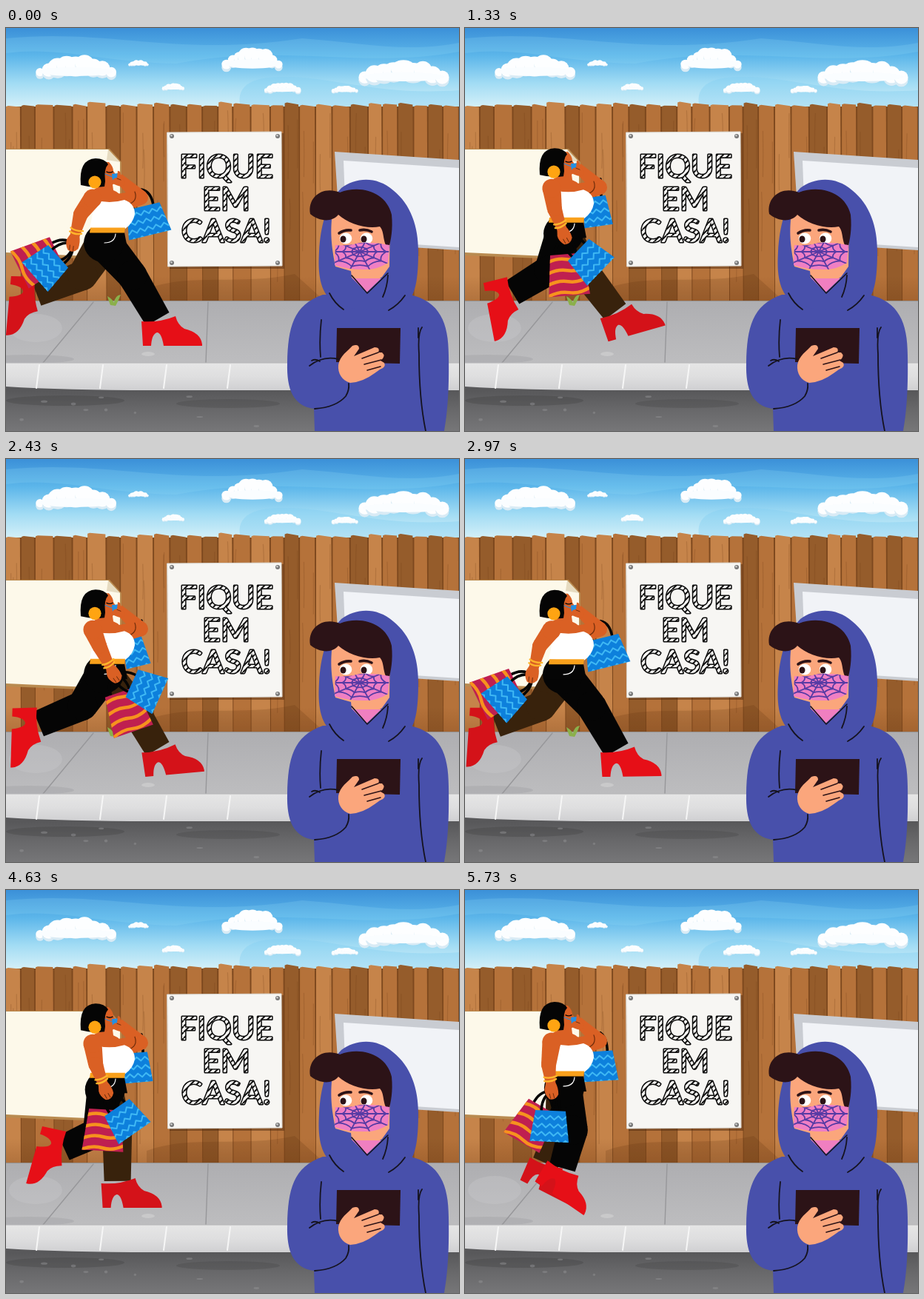
Recreate the animation shown at these times as an HTML page with a canvas. Size 612x544 px, loop 5760 ms.

```html
<!DOCTYPE html>
<html lang="pt">
<head>
<meta charset="utf-8">
<title>Fique em casa</title>
<style>
html, body { margin: 0; width: 100%; height: 100%; overflow: hidden; background: #6d6d70; }
canvas { display: block; width: 612px; height: 544px; }
</style>
</head>
<body>
<canvas id="stage" width="612" height="544"></canvas>
<script>
const W = 612, H = 544, LOOP = 5760, STRIDE = 995, FPS = 30, TAU = Math.PI * 2;
const ctx = document.getElementById('stage').getContext('2d');
let c = ctx;

// ---------- helpers ----------
let seed = 11;
const rnd = () => (seed = (seed * 16807) % 2147483647) / 2147483647;

function layer(paint) {
  const cv = document.createElement('canvas');
  cv.width = W; cv.height = H;
  c = cv.getContext('2d');
  paint();
  c = ctx;
  return cv;
}
function fill(d, color) { c.fillStyle = color; c.fill(new Path2D(d)); }
function line(d, color, w) {
  c.strokeStyle = color; c.lineWidth = w;
  c.lineCap = c.lineJoin = 'round';
  c.stroke(new Path2D(d));
}
function oval(x, y, rx, ry, color) {
  c.fillStyle = color;
  c.beginPath(); c.ellipse(x, y, rx, ry, 0, 0, TAU); c.fill();
}
function grad(y0, y1, ...stops) {
  const g = c.createLinearGradient(0, y0, 0, y1);
  stops.forEach((s, i) => g.addColorStop(i / (stops.length - 1), s));
  return g;
}
function place(x, y, deg, paint) {
  c.save();
  c.translate(x, y);
  c.rotate(deg * TAU / 360);
  paint();
  c.restore();
}

// ---------- street ----------
function cloud(x, y, w, h) {
  const n = 9;
  for (let i = 0; i < n; i++) {
    const u = i / (n - 1), arch = Math.sin(Math.PI * u);
    const r = w * (.05 + .06 * arch + .03 * rnd()), px = x + (u - .5) * w * .86;
    const py = y + h * (.24 - .42 * arch * (.5 + .5 * rnd()));
    oval(px, py + h * .1, r, Math.min(r, h * .34), '#d9ebf5');
    oval(px, py, r, Math.min(r, h * .32), '#fdfeff');
  }
  oval(x, y + h * .22, w * .45, h * .17, '#fafdff');
}

function sky() {
  c.fillStyle = grad(0, 112, '#3b90d8', '#5cb6ea', '#a2dcf4', '#dcf3f9');
  c.fillRect(0, 0, W, 120);
  fill('M0 14 C140 0 230 40 400 14 C480 20 540 34 612 20 V32 C480 56 380 20 230 48 C130 46 70 24 0 34Z', 'rgba(150,218,246,.2)');
  fill('M318 110 C308 80 330 66 370 66 C440 64 500 92 612 84 V112Z', 'rgba(130,205,240,.4)');
  cloud(94, 51, 112, 36);
  cloud(179, 47, 28, 9);
  cloud(226, 79, 30, 10);
  cloud(333, 40, 82, 38);
  cloud(373, 80, 50, 16);
  cloud(537, 58, 122, 36);
  cloud(458, 82, 36, 11);
}

function fence() {
  c.fillStyle = '#7d481e';
  c.fillRect(0, 106, W, 264);
  const tones = ['#c6844a', '#b5723a', '#955c2b'];
  let tone = 1;
  for (let x = 0, w; x < W; x += w) {
    w = 18 + rnd() * 9;
    tone = (tone + 1 + Math.floor(rnd() * 2)) % 3;
    const b = x + w, top = 99 + rnd() * 6;
    fill(`M${x} ${top + 1} L${x + 3} ${top} L${b - 2} ${top + rnd() * 3} L${b - .8} 368 H${x}Z`, tones[tone]);
    for (let k = 0; k < 3; k++) {
      const gx = x + 3 + rnd() * (w - 6), gy = top + 10 + rnd() * 150;
      line(`M${gx} ${gy} q${rnd() * 4 - 2} 30 0 ${40 + rnd() * 60}`, 'rgba(110,60,22,.22)', 1.2);
    }
  }
  c.fillStyle = grad(335, 368, 'rgba(95,45,10,0)', 'rgba(95,45,10,.2)');
  c.fillRect(0, 335, W, 33);
  fill('M190 352 C250 330 320 348 390 332 L430 368 H190Z', 'rgba(90,45,14,.18)');
}

function boards() {
  fill('M0 163 H140 L156 181 V313 L0 307Z', '#b98b50');
  fill('M0 164 H138 L154 181 V310 L0 303Z', '#fdf9ea');
  fill('M138 164 L154 181 L136 178Z', '#e6dbc0');
  fill('M444 167 L612 178 V300 L452 290Z', '#c9ccd2');
  fill('M456 179 L612 189 V296 L460 286Z', '#f1f3f7');

  fill('M219 143 L375 142 L376 325 L221 325Z', 'rgba(70,35,10,.45)');
  fill('M218 141 L372 140 L373 321 L219 322Z', '#f7f6f3');
  line('M218 141 L372 140 L373 321 L219 322Z', '#dad7d0', 1);
  for (const x of [224, 367]) for (const y of [146, 317]) {
    oval(x, y, 3, 3, '#777');
    oval(x - .6, y - .8, 1.3, 1.3, '#ccc');
  }
  sign();
}

function sign() {
  const tile = document.createElement('canvas');
  tile.width = tile.height = 8;
  const t = tile.getContext('2d');
  t.fillStyle = '#f7f6f3'; t.fillRect(0, 0, 8, 8);
  t.strokeStyle = '#111'; t.lineWidth = 2;
  t.beginPath();
  for (const k of [-8, 0, 8]) { t.moveTo(k, 8); t.lineTo(k + 8, 0); }
  t.stroke();
  c.font = '400 43px Lato, "Open Sans", sans-serif';
  c.textAlign = 'center';
  c.lineJoin = 'round';
  ['FIQUE', 'EM', 'CASA!'].forEach((s, i) => {
    const y = 202 + i * 43.5;
    c.strokeStyle = '#0c0c0c'; c.lineWidth = 3;
    c.strokeText(s, 297.5, y);
    c.fillStyle = c.createPattern(tile, 'repeat');
    c.fillText(s, 297.5, y);
  });
}

function ground() {
  c.fillStyle = grad(368, 453, '#aeaeb1', '#bdbdbf');
  c.fillRect(0, 368, W, 85);
  line('M0 368.5 H612', '#96918e', 1.2);
  oval(40, 405, 36, 19, 'rgba(200,200,202,.35)');
  oval(30, 447, 62, 6, 'rgba(150,150,154,.3)');
  oval(192, 440, 9, 3, 'rgba(215,215,215,.5)');
  line('M118 370 L50 452 M273 370 L270 452', '#97979a', 1.4);
  fill('M141 374 Q138 366 137 362 Q144 366 146 371 Q147 361 155 360 Q151 370 148 375Z', '#8bb04b');

  c.fillStyle = grad(490, 544, '#58585a', '#69696b', '#767678');
  c.fillRect(0, 480, W, 64);
  oval(80, 503, 80, 7, 'rgba(60,60,62,.3)');
  oval(300, 507, 70, 6, 'rgba(60,60,62,.25)');
  for (let i = 0; i < 22; i++) oval(rnd() * W, 496 + rnd() * 46, 1.5 + rnd() * 3, 1 + rnd(), 'rgba(150,150,153,.45)');

  c.fillStyle = grad(452, 490, '#e6e6e6', '#dededf', '#cfcfd1');
  c.fill(new Path2D('M0 452 H612 V489 H200 Q80 489 0 484Z'));
  line('M0 452 H612', '#b4b4b6', 1);
  for (let x = 45; x < 400; x += 86) line(`M${x} 455 L${x - 4} 486`, '#f6f6f6', 2);
}

// ---------- boy with the mask ----------
function boy() {
  const blue = '#4850ab', ink = '#15131f', skin = '#fba67c', dark = '#2c1317';
  fill('M417 544 L416 514 C388 510 379 488 380 452 C381 404 388 374 428 360 L546 360 C586 369 598 398 598 442 C599 490 596 522 592 544Z', blue);
  fill('M453 216 C472 202 500 199 523 219 C547 238 557 268 557 302 C557 335 554 366 538 371 C508 384 465 384 440 368 C421 352 422 322 423 302 C425 268 432 238 453 216Z', blue);

  // face and neck
  fill('M441 250 H519 L518 322 L508 336 L487 350 L467 337 L466 328 L445 322 C441 300 437 280 441 250Z', skin);
  fill('M468 338 H507 L487 357Z', '#f07fc0');
  line('M467 334 L488 358 L516 331', ink, 1.6);
  fill('M411 251 C407 228 428 213 451 222 C480 211 514 222 521 252 C523 272 520 286 517 298 C508 290 512 275 505 268 C487 272 462 264 449 252 C441 262 424 262 411 251Z', dark);

  for (const x of [459, 487]) {
    oval(x, 284, 8.3, 7.5, '#fff');
    oval(x - 3.5, 285, 4, 4.5, dark);
  }
  line('M450 277 Q457 272 466 273 M478 273 Q486 271 494 275', dark, 3.6);

  // mask with web
  const mask = 'M445 293 Q460 295 478 290 Q498 289 518 293 L516 317 Q500 327 484 326 Q460 326 444 320Z';
  fill(mask, '#f07fc4');
  c.save();
  c.clip(new Path2D(mask));
  const cx = 478, cy = 302, spokes = 10;
  const tip = (i, r) => [cx + Math.cos(i * TAU / spokes) * r * 1.7, cy + Math.sin(i * TAU / spokes) * r];
  let web = '';
  for (let i = 0; i < spokes; i++) {
    web += `M${cx} ${cy} L${tip(i, 30)}`;
    for (let r = 7; r < 28; r += 7) web += `M${tip(i, r)} Q${tip(i + .5, r * .78)} ${tip(i + 1, r)}`;
  }
  line(web, '#573ba4', 1.8);
  c.restore();

  // folds
  line('M437 358 Q444 372 456 380 M539 361 Q530 374 517 381 M516 334 Q515 350 509 363', ink, 1.8);
  line('M426 394 Q423 420 425 444 M557 418 V405 M562 404 Q556 412 558 440 Q558 500 567 544', ink, 1.8);

  // tablet, hand, sleeve
  fill('M447 405 H533 L532 453 L446 451Z', dark);
  fill('M449 455 C451 442 462 436 468 429 Q477 426 477 433 L470 443 L498 431 Q506 431 503 438 L508 438 Q514 443 506 449 L511 452 Q514 458 505 461 L498 466 Q482 478 465 479 C454 476 448 466 449 455Z', skin);
  line('M481 446 L503 438 M484 454 L507 448 M488 462 L506 457', dark, 1.5);
  line('M410 456 Q428 442 449 447 M413 449 Q418 446 424 450', ink, 1.8);
  line('M417 514 Q446 512 459 497 Q464 489 463 480', ink, 1.8);
}

// ---------- walking shopper ----------
const SKIN = '#da6024', CREASE = '#6f2d0c', BLACK = '#050505', BROWN = '#38220c';
const wave = (q, lead = 0) => Math.cos(TAU * (q + lead));

// key poses of a foot: phase, ankle x y, turn
const STEP = [
  [0, 205, 393, 0], [.153, 152, 393, 0], [.304, 89, 360, 45], [.35, 60, 357, 84],
  [.5, 41, 358, 95], [.653, 77, 348, 106], [.76, 130, 375, 36], [.85, 205, 384, -17]];

// smooth monotone curve through the periodic keys
function sample(keys, q) {
  const n = keys.length;
  q -= Math.floor(q);
  const key = (i, v) => {
    const turn = Math.floor(i / n);
    return keys[i - turn * n][v] + (v ? 0 : turn);
  };
  let i = n - 1;
  while (keys[i][0] > q) i--;
  const slope = (j, v) => (key(j + 1, v) - key(j, v)) / (key(j + 1, 0) - key(j, 0));
  const tangent = (j, v) => {
    const a = slope(j - 1, v), b = slope(j, v);
    return a * b <= 0 ? 0 : 2 * a * b / (a + b);
  };
  const h = key(i + 1, 0) - key(i, 0), u = (q - key(i, 0)) / h;
  return keys[0].slice(1).map((_, k) => {
    const v = k + 1, a = key(i, v), b = key(i + 1, v);
    return a + (b - a) * u * u * (3 - 2 * u) +
      h * u * (1 - u) * (tangent(i, v) * (1 - u) - tangent(i + 1, v) * u);
  });
}

function limb(pts, widths, color) {
  for (let i = 0; i < pts.length - 1; i++) {
    const [x0, y0] = pts[i], [x1, y1] = pts[i + 1];
    const d = Math.hypot(x1 - x0, y1 - y0), nx = (y0 - y1) / d / 2, ny = (x1 - x0) / d / 2;
    const a = widths[i], b = widths[i + 1];
    fill(`M${x0 + nx * a} ${y0 + ny * a} L${x1 + nx * b} ${y1 + ny * b} L${x1 - nx * b} ${y1 - ny * b} L${x0 - nx * a} ${y0 - ny * a}Z`, color);
    oval(x0, y0, a / 2, a / 2, color);
  }
}

function leg(q, hip, color, shoe) {
  const [ax, ay, turn] = sample(STEP, q);
  const knee = [137 + 34 * wave(q, .03), 329 + 5 * wave(2 * q)];
  limb([hip, knee, [ax, ay]], [48, 40, 36], color);
  place(ax, ay, turn, () => fill('M-22 3 Q2 5 24 -4 Q27 8 36 13 Q58 18 60 34 L60 36 H8 Q5 18 -1 18 Q-8 20 -9 36 H-20Z', shoe));
}

function bag(x, y, turn, width, h, [gx, gy], striped) {
  const top = width * .77;
  const a = turn * TAU / 360, co = Math.cos(a), si = Math.sin(a);
  const at = (u, v) => [x + u * co - v * si, y + u * si + v * co];
  const side = s => `M${at(s * top * .3, 3 - h / 2)} Q${at(s * top * .34, -h / 2 - 17)} ${gx} ${gy}`;
  line(side(-1) + side(1), BLACK, 3.6);
  place(x, y, turn, () => {
    const shape = new Path2D(`M${-top / 2} ${-h / 2} H${top / 2} L${width / 2} ${h / 2} H${-width / 2}Z`);
    c.fillStyle = striped ? '#bf1f50' : '#0d80dc';
    c.fill(shape);
    c.clip(shape);
    if (striped) {
      for (let k = -30; k < 46; k += 15) line(`M-34 ${k} Q-16 ${k - 10} 0 ${k - 6} T34 ${k - 14}`, '#f6921e', 4.5);
    } else {
      for (let k = -14; k < h / 2; k += 11) {
        let d = `M-33 ${k}`;
        for (let i = 1; i < 13; i++) d += `L${i * 5.5 - 33} ${k + (i % 2 ? 5 : 0)}`;
        line(d, '#3fb8f4', 2);
      }
    }
  });
}

function farArm(drop, back) {
  bag(182 + 8 * back, 264 - 3 * drop, -3 - 11 * drop, 46 + 13 * back, 40, [183, 219], false);
  limb([[148, 238], [182, 230], [152, 203]], [25, 20, 13], SKIN);
  line('M168 238 Q178 233 174 222', CREASE, 1.2);
}

function torso() {
  fill('M113 277 H160 L164 298 H108Z', BLACK);
  line('M133 291 Q147 291 148 279', '#fff', 1.2);
  fill('M122 205 H143 L145 220 Q156 224 158 234 L112 240 Q110 222 124 216Z', SKIN);
  fill('M119 233 Q140 239 160 233 Q174 238 174 252 Q172 264 161 272 L113 271 Q118 250 119 233Z', '#fff');
  fill('M114 270.5 H161 L160 277.5 H113Z', '#f9a01b');
}

function head() {
  fill('M121 182 H139 Q145 188 145 194 L151 203 Q150 212 139 214 H122Z', SKIN);
  fill('M101 213 Q98 178 121 177 Q133 177 138 185 Q132 191 134 208 L133 215 Q116 217 101 213Z', BLACK);
  line('M136 195 Q140 197 144 195', BLACK, 1.4);
  fill('M143 198 L151 197 L154 205 Q149 210 144 207Z', '#2490e4');
  line('M134 198 L144 202', '#2490e4', 1);
  oval(120, 209, 8.6, 8.6, '#ffa412');
  // hand at the chin
  fill('M143 210 Q144 203 150 203 L151 194 Q155 193 155 201 Q162 207 160 213 Q154 217 143 210Z', SKIN);
  line('M150 204 L155 206', CREASE, 1);
}

function nearArm(q, back, dy) {
  const mid = 1 - back * back;
  const elbow = [114 - 13 * back, 252 + 10 * mid + dy];
  const hand = [119 - 29 * back, 292 + 6 * mid + dy];
  const hang = (turn, reach, width, h, striped) => {
    const a = turn * TAU / 360;
    bag(hand[0] - Math.sin(a) * reach, hand[1] + Math.cos(a) * reach, turn, width, h, hand, striped);
  };
  hang(22 + 42 * wave(q, .02), 52, 56, 56, true);
  hang(-9 + 58 * wave(q, .02), 47, 53, 42, false);

  const wrist = elbow.map((e, i) => e + (hand[i] - e) * .72);
  limb([[117, 231 + dy], elbow, wrist], [25, 20, 13], SKIN);
  const lean = Math.atan2(elbow[0] - hand[0], hand[1] - elbow[1]) * 360 / TAU;
  place(...hand, lean, () => {
    fill('M-6 -13 H6 Q10 -4 9 5 Q4 13 -4 10 Q-10 3 -9 -4Z', SKIN);
    line('M-3 3 L-2 9 M2 3 L3 9', CREASE, 1);
    line('M-8 -15 Q0 -12 8 -16 M-8 -20 Q0 -17 9 -20', '#ffb52b', 2.4);
  });
}

function shopper(q) {
  const drop = wave(q, .03) ** 2, dy = 28 * (drop - 1), back = wave(q);
  const hip = [134 - 2 * drop, 290 + dy * .9];

  place(0, dy, 0, () => farArm(drop, back));
  leg(q + .5, hip, BROWN, '#d41219');
  leg(q, hip, BLACK, '#e60f17');
  oval(hip[0], hip[1] + 1, 27, 26, BLACK);
  place(0, dy, 0, () => { torso(); head(); });
  nearArm(q, back, dy);
}

// ---------- play ----------
const street = layer(() => { sky(); fence(); boards(); ground(); });
const front = layer(boy);

function draw(now) {
  const t = Math.floor((now % LOOP) * FPS / 1000 + .15) * 1000 / FPS;
  ctx.drawImage(street, 0, 0);
  shopper(t / STRIDE);
  ctx.drawImage(front, 0, 0);
}
let start = null;
function tick(now) {
  if (start === null) start = now;
  draw(now - start);
  requestAnimationFrame(tick);
}
draw(0);
requestAnimationFrame(tick);
</script>
</body>
</html>
```
